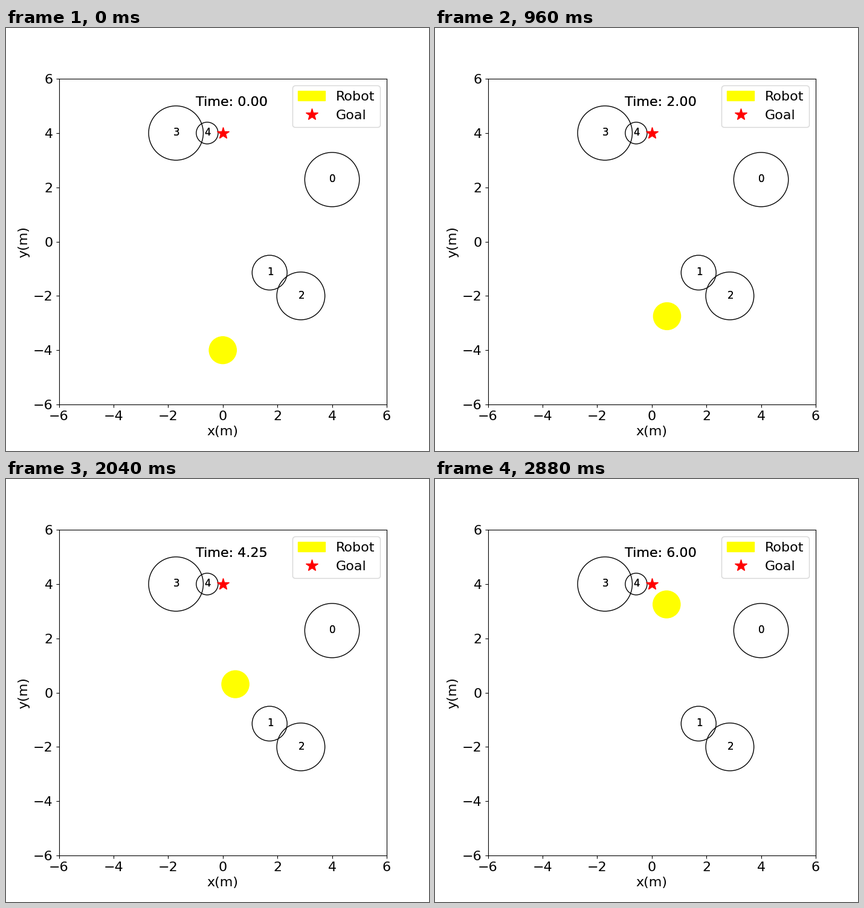
A matplotlib script that plays this animation: 700x700 px, repeating every 3000 ms.

```python
import matplotlib.pyplot as plt
import numpy as np
from matplotlib.animation import FuncAnimation

FRAMES, INTERVAL = 25, 120
TIME_STEP = 0.25
START_Y = -4.0
CELL = 4 / 7

# obstacles: column and row on a regular grid, radius
HUMANS = [(7, 4, 1.0), (3, -2, 0.64), (5, -3.5, 0.88), (-3, 7, 1.0), (-1, 7, 0.4)]

# the robot swerves sideways between these steps
TURNS = [0, 3, 5, 8, 13, 15, 17, 20, 22, 24]
SWERVE = [0, 0.37, 0.514, 0.558, 0.377, 0.465, 0.461, 0.611, 0.467, 0.543]


def robot_path():
    """Slow start, then a ramp up to a steady climb."""
    steps = np.arange(FRAMES)
    climb = np.interp(steps, [1, 5, 10, 13], [0.122, 0.17, 0.18, 0.42])
    climb[0] = 0
    xs = np.interp(steps, TURNS, SWERVE)
    return np.column_stack([xs, START_Y + np.cumsum(climb)])


def add_text(ax, x, y, label, size):
    # drawn twice, which thickens the antialiased edges
    return [ax.text(x, y, label, fontsize=size, color="black")
            for _ in range(2)]


plt.rcParams.update({
    "font.family": "DejaVu Sans",
    "text.hinting": "force_autohint",
    "text.hinting_factor": 8,
})

path = robot_path()
fig, ax = plt.subplots(figsize=(7, 7), dpi=100)
ax.tick_params(labelsize=16)
ax.set_xlim(-6, 6)
ax.set_ylim(-6, 6)
ax.set_xlabel("x(m)", fontsize=16)
ax.set_ylabel("y(m)", fontsize=16)

robot = plt.Circle(path[0], 0.5, fill=True, color="yellow")
ax.add_artist(robot)
goal, = ax.plot([0], [4], color="red", marker="*", linestyle="None",
                markersize=15)
ax.legend([robot, goal], ["Robot", "Goal"], fontsize=16, loc="upper right")

for i, (column, row, radius) in enumerate(HUMANS):
    x, y = column * CELL, row * CELL
    ax.add_artist(plt.Circle((x, y), radius, fill=False, color="black"))
    add_text(ax, x - 0.1, y - 0.1, str(i), 12)

clock = add_text(ax, -1, 5, "Time: 0.00", 16)


def update(step):
    robot.center = path[step]
    for text in clock:
        text.set_text(f"Time: {step * TIME_STEP:.2f}")
    return [robot, *clock]


anim = FuncAnimation(fig, update, frames=FRAMES, interval=INTERVAL,
                     repeat=True, repeat_delay=0)
plt.show()
```
